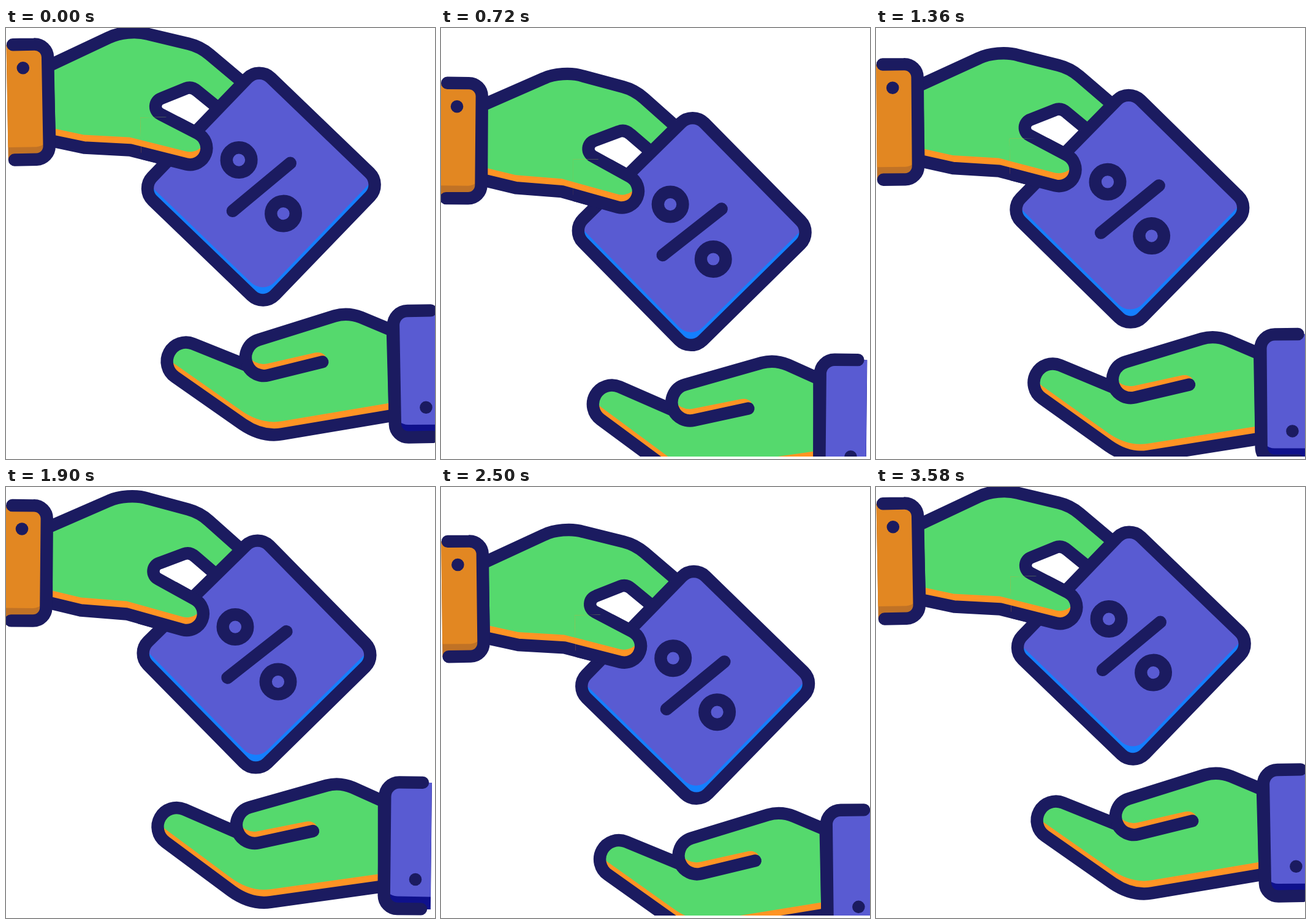
An HTML page with a canvas for the animation above (3.6 s loop, 700 by 704 pixels).

```html
<!DOCTYPE html>
<html lang="en">
<head>
<meta charset="utf-8">
<title>Discount hand-over</title>
<style>
  html, body { margin: 0; width: 100%; height: 100%; overflow: hidden; background: #fff; }
  canvas { display: block; }
</style>
</head>
<body>
<canvas id="stage" width="700" height="704"></canvas>
<script>
const ctx = document.getElementById('stage').getContext('2d');

const NAVY = '#1b1b60', GREEN = '#55d96d', ORANGE = '#ff9424';
const PURPLE = '#595bd2', BLUE = '#147fff', DEEP_BLUE = '#0f118c';
const RUST = '#e28722', DARK_RUST = '#c07226';

const LOOP = 3600, STEP = 20;
const LIFT = 68.6, SWING = 1.94 * Math.PI / 180;
// Pose in which the shapes below are laid out
const BASE_Y = 2.5, BASE_TILT = SWING * 0.8156;

const path = d => new Path2D(d);

const shapes = {
  giver: path('M66,67 L168,22.5 C184,15 212,12.5 232,19 L297,36.5 C310,40 322,47 331,55 ' +
    'L386,104 L345,145 L309,114 Q300,105.5 290,109.5 L250.4,124.3 A14,14 0 0 0 248.3,150.3 ' +
    'L308,183.3 A27,27 0 0 1 288,233 L197,207.5 L122,201.5 L66,188 Z'),
  giverLit: path('M60,-60 V186.5 L122,201.5 L197,207.5 L288,233 A27,27 0 0 0 322,207 L420,120 V-60 Z'),

  taker: path('M617,514 L566,491 C552,485 538,483.5 523,487.5 L398,523 A30,30 0 0 0 379,565 ' +
    'L291,526.6 A31,31 0 0 0 260.2,580 L368,660 C386,673 408,681.5 432,678 L617,652 Z'),
  takerLit: path('M247.5,400 V555 A31,31 0 0 0 260.2,580 L368,660 ' +
    'C386,673 408,681.5 432,678 L617,652 V400 Z'),
  thumbShade: path('M376,552 A30,30 0 0 0 412.4,581.3 L501,562 L506,552 Q500,545 490,546.5 ' +
    'L411,562.3 A30,30 0 0 1 378,545 Z'),
  crease: path('M379,565 A30,30 0 0 0 412.4,581.3 L501,562'),

  leftCuff: path('M10.3,30 L45,30.3 A21.5,21.5 0 0 1 66.8,52 L65.4,197 A21.5,21.5 0 0 1 44,218.5 L8,218.3'),
  leftSleeve: path('M-0.3,30 L45,30.3 A21.5,21.5 0 0 1 66.8,52 L65.4,197 A21.5,21.5 0 0 1 44,218.5 L-2.2,218 Z'),
  rightCuff: path('M680,482.8 L642,482.4 A23.5,23.5 0 0 0 618.3,506 L616.7,667 A22,22 0 0 0 638.5,689 L677,689.3'),
  rightSleeve: path('M695,483 L642,482.4 A23.5,23.5 0 0 0 618.3,506 L616.7,667 A22,22 0 0 0 638.5,689 L692.8,690 Z'),

  slash: path('M457.5,236 L361.5,311.5')
};

const card = new Path2D();
const square = new Path2D();
square.roundRect(-139, -139, 278, 278, 27);
card.addPath(square, new DOMMatrix().translate(409, 273).rotate(45.5));

function fill(shape, color) {
  ctx.fillStyle = color;
  ctx.fill(shape);
}

function outline(shape) {
  ctx.stroke(shape);
}

// Shade colour, with the lit colour raised so that a rim stays along the bottom
function shaded(shape, shade, light, rise, lit = shape) {
  fill(shape, shade);
  ctx.save();
  ctx.clip(shape);
  ctx.translate(0, -rise);
  fill(lit, light);
  ctx.restore();
}

function circle(x, y, r) {
  const disc = new Path2D();
  disc.arc(x, y, r, 0, 2 * Math.PI);
  return disc;
}

function drawGiver() {
  shaded(shapes.giver, ORANGE, GREEN, 21, shapes.giverLit);
  outline(shapes.giver);
}

function drawCard() {
  shaded(card, BLUE, PURPLE, 21);
  outline(card);
  outline(circle(374, 228.5, 20.3));
  outline(circle(444, 318, 20.3));
  outline(shapes.slash);
}

function drawTaker() {
  shaded(shapes.taker, ORANGE, GREEN, 21, shapes.takerLit);
  fill(shapes.thumbShade, ORANGE);
  outline(shapes.taker);
  outline(shapes.crease);
}

function drawSleeve(sleeve, cuff, shade, light, x, y) {
  shaded(sleeve, shade, light, 20.5);
  // The raised copy leaves the top open only under the cuff line
  outline(cuff);
  fill(circle(x, y, 10.3), NAVY);
}

function drawScene() {
  drawGiver();
  drawCard();

  // The thumb lies over the card
  ctx.save();
  ctx.beginPath();
  ctx.rect(215, 155, 130, 110);
  ctx.clip();
  drawGiver();
  ctx.restore();

  drawTaker();
  drawSleeve(shapes.leftSleeve, shapes.leftCuff, DARK_RUST, RUST, 26, 68.5);
  drawSleeve(shapes.rightSleeve, shapes.rightCuff, DEEP_BLUE, PURPLE, 668, 641);
}

function render(ms) {
  // The last step of the loop shows the starting pose again
  const step = Math.floor((ms % LOOP) / STEP);
  const t = step * LOOP / (LOOP / STEP - 1);
  const y = LIFT * (1 - Math.cos(2 * Math.PI * t / 1800)) / 2;
  const tilt = SWING * (1 - Math.abs((t % 1200) / 600 - 1));

  ctx.setTransform(1, 0, 0, 1, 0, 0);
  ctx.fillStyle = '#fff';
  ctx.fillRect(0, 0, 700, 704);

  ctx.save();
  ctx.beginPath();
  ctx.rect(0, 0, 700, 700);
  ctx.clip();
  ctx.translate(0, y);
  ctx.rotate(tilt - BASE_TILT);
  ctx.translate(0, -BASE_Y);
  ctx.strokeStyle = NAVY;
  ctx.lineWidth = 20.4;
  ctx.lineCap = ctx.lineJoin = 'round';
  drawScene();
  ctx.restore();
}

const start = performance.now();
function tick() {
  render(performance.now() - start);
  requestAnimationFrame(tick);
}
tick();
</script>
</body>
</html>
```
